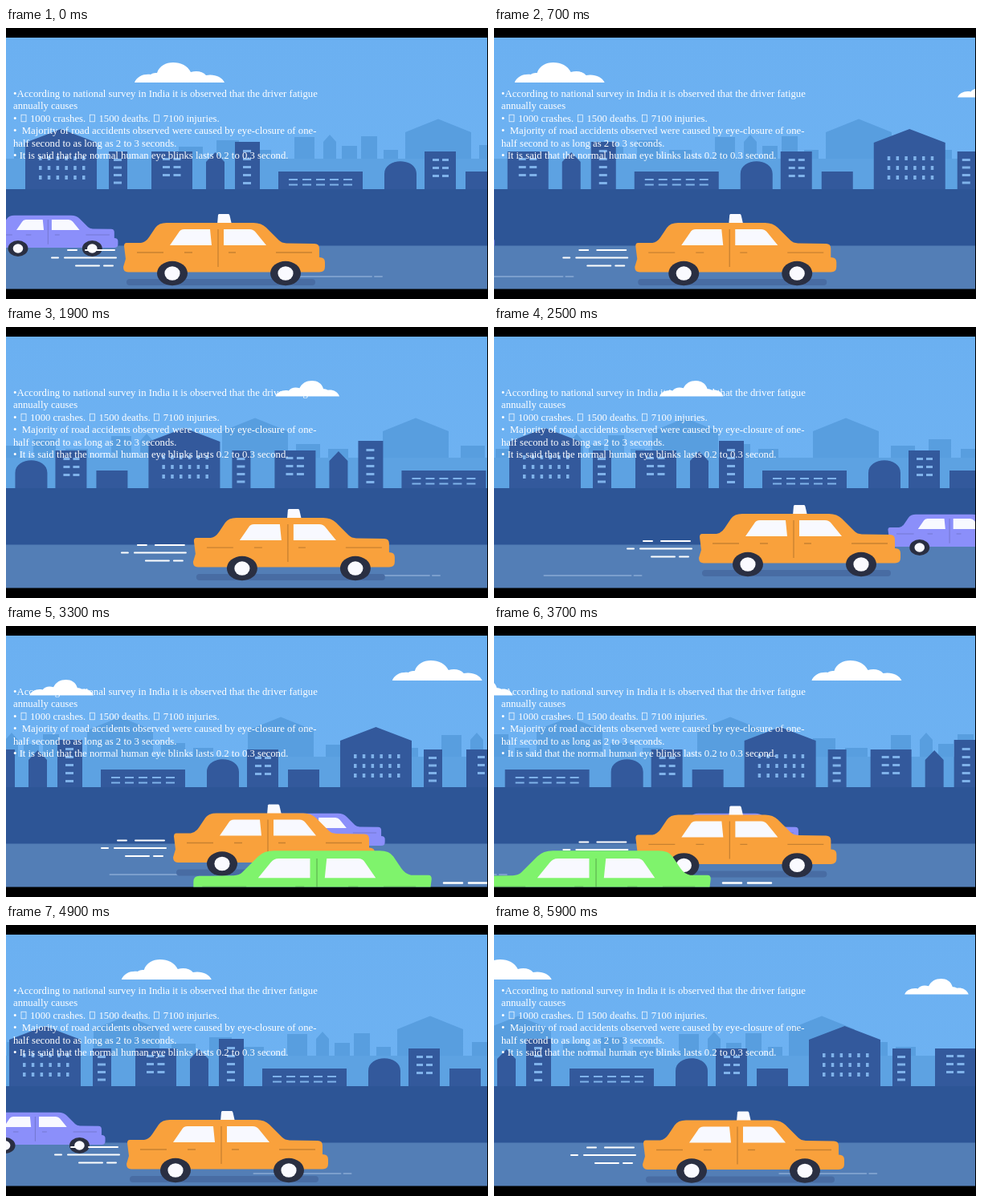
An HTML page that plays this animation: 600 px wide and 338 px high, repeating every 6000 ms.

```html
<!DOCTYPE html>
<html lang="en">
<head>
<meta charset="utf-8">
<title>Driver fatigue</title>
<style>
html, body { margin: 0; width: 100%; height: 100%; overflow: hidden; background: #000; }
svg { display: block; width: 600px; height: 338px; }
text { font: 12.73px "Liberation Serif", "Times New Roman", serif; fill: #fff; white-space: pre; }
</style>
</head>
<body>
<svg viewBox="0 0 600 338">
  <defs>
    <linearGradient id="sky" x1="0" y1="0" x2="0" y2="1">
      <stop offset="0" stop-color="#6bb0f1"/>
      <stop offset="1" stop-color="#6eb2f2"/>
    </linearGradient>
    <clipPath id="stage"><rect y="12" width="599" height="313.500"/></clipPath>
    <path id="cloud" fill="#fff" d="M0 25C3 17 12 14 20 15C23 13 26 13 28 13C31 4 39 0 48 0C58 0 66 4 70 12C77 10 85 11 89 16C99 14 109 18 112 25Z"/>
    <g id="car">
      <path d="M4-38H22Q28-39 32-45L40-57Q44-63 54-63H162Q172-63 178-57L194-41Q197-38 203-37.500L238-37Q244-37 244-31V-20Q251-20 251-14V-8Q251-1.500 244-1.500H6Q0-1.500 0-8L3-18L1-34Q1-38 4-38Z"/>
      <path fill="#f8f9ff" d="M58-35L69-51Q71-55 76-55H108L110-35ZM125-55H157Q162-55 165-51L178-35H125Z"/>
      <path fill="none" stroke="#000" stroke-opacity=".2" stroke-width="1.3" d="M118-55V-8M17-26H50M76-26H86M131-26H140M190-26H235"/>
      <g fill="#2a2f42"><ellipse cx="61" rx="19" ry="15.2"/><ellipse cx="202" rx="19" ry="15.2"/></g>
      <g fill="#fafaff"><ellipse cx="61" rx="9.6" ry="8.7"/><ellipse cx="202" rx="9.6" ry="8.7"/></g>
    </g>
  </defs>
  <g clip-path="url(#stage)">
    <rect y="12" width="600" height="192" fill="url(#sky)"/>
    <g id="far" fill="#589edf"></g>
    <rect y="163" width="600" height="40" fill="#5da2e2"/>
    <g id="near" fill="#33599c"></g>
    <use id="bigCloud" href="#cloud"/>
    <use id="smallCloud" href="#cloud"/>
    <rect y="201" width="600" height="71" fill="#2d5596"/>
    <rect y="271.5" width="600" height="55" fill="#537eb6"/>
    <path id="streak" stroke="#7c9fcd" stroke-width="2" stroke-linecap="round" d="M1 310H109M113 310H122"/>
    <use id="purple" href="#car" fill="#8b8ffa"/>
    <g id="taxi">
      <rect x="4" y="7" width="235" height="8" rx="4" fill="#486ca3"/>
      <path stroke="#fff" stroke-width="2" stroke-linecap="round" d="M-69-29H-58M-47-29H-11M-89-19.500H-81M-73-19.500H-9M-59-9.500H-30M-24-9.500H-13"/>
      <path fill="#fafaff" d="M119-74H131Q132-74 132.500-72L135-61H117L118-73Z"/>
      <use href="#car" fill="#f9a13c"/>
    </g>
    <g id="green">
      <use href="#car" fill="#7ff36c" transform="translate(299 357) scale(-1.22 1.22)"/>
      <path stroke="#fff" stroke-width="2.500" stroke-linecap="round" d="M313 320.500H336M344 320.500H373"/>
    </g>
  </g>
  <g id="copy"></g>
</svg>
<script>
const LOOP = 6000, STEP = 100;
const $ = id => document.getElementById(id);

function add(parent, tag, attrs) {
  const el = document.createElementNS("http://www.w3.org/2000/svg", tag);
  for (const k in attrs) el.setAttribute(k, attrs[k]);
  parent.appendChild(el);
  return el;
}
const move = (id, x, y, scale = "") =>
  $(id).setAttribute("transform", `translate(${x.toFixed(2)} ${y.toFixed(2)}) ${scale}`);

// Skylines are one path each: boxes and pitched roofs standing on the ground line
const GROUND = 204;
const box = (x, w, top) => `M${x} ${GROUND}V${top}h${w}V${GROUND}Z`;
const gable = (x, w, peak, eave) =>
  `M${x} ${GROUND}V${eave}L${x + w / 2} ${peak}L${x + w} ${eave}V${GROUND}Z`;
function grid(x, y, cols, rows, dx, dy, w, h) {
  let d = "";
  for (let i = 0; i < cols; i++)
    for (let j = 0; j < rows; j++) d += `M${x + i * dx} ${y + j * dy}h${w}v${h}h${-w}Z`;
  return d;
}

const BLOCK = 613;
const walls = [
  gable(0, 89, 126, 143), box(104, 23, 154), box(157, 51, 154),
  gable(225, 23, 155, 167), box(261, 31, 142), box(315, 105, 179),
  `M447 ${GROUND}V182C447 161 487 161 487 182V${GROUND}Z`,
  box(497, 39, 154), box(548, 39, 179)
].join("");
const panes = [
  grid(17, 160, 6, 3, 10.8, 12, 3.5, 5), grid(110, 163, 1, 4, 0, 9.5, 10, 3),
  grid(171, 162, 2, 3, 13.5, 10, 9, 3), grid(271, 152, 1, 5, 0, 10, 10, 3),
  grid(328, 188, 5, 2, 17, 6.5, 11, 2), grid(507, 163, 2, 3, 12, 10, 8, 3)
].join("");
for (let i = -1; i < 4; i++) {
  const g = add($("near"), "g", { transform: `translate(${24 + i * BLOCK})` });
  add(g, "path", { d: walls });
  add(g, "path", { d: panes, fill: "#7fb2ea" });
}

const FAR_BLOCK = 579;
const farTops = [[10, 30, 146], [50, 25, 152], [215, 30, 148], [262, 28, 140], [302, 28, 152],
  [359, 25, 136], [418, 19, 147], [442, 20, 135], [470, 18, 152]];
for (let i = 0; i < 3; i++) {
  const o = i * FAR_BLOCK;
  add($("far"), "path", {
    d: farTops.map(([x, w, top]) => box(x + o, w, top)).join("") + gable(395 + o, 16, 133, 142)
  });
}
for (const peak of [538, 738, 1116]) add($("far"), "path", { d: gable(peak - 41, 82, 113.5, 130) });

// Text block, with the empty boxes of the second bullet
const lines = [
  [0, 9, "•According to national survey in India it is observed that the driver fatigue"],
  [1, 9, "annually causes"],
  [2, 9, "•"], [2, 30, "1000 crashes."], [2, 115.5, "1500 deaths."], [2, 195.8, "7100 injuries."],
  [3, 9, "•  Majority of road accidents observed were caused by eye-closure of one-"],
  [4, 9, "half second to as long as 2 to 3 seconds."],
  [5, 9, "• It is said that the normal human eye blinks lasts 0.2 to 0.3 second."]
];
for (const [row, x, str] of lines)
  add($("copy"), "text", { x, y: 86 + row * 15.42 }).textContent = str;
for (const x of [19, 104.3, 184.6])
  add($("copy"), "rect", { x, y: 108.2, width: 6, height: 8.6, fill: "none", stroke: "#fff", "stroke-width": 0.7 });

// time, distance travelled, taxi x, taxi wheel height
const keys = [
  [0, 0, 146, 306], [1400, 332, 205, 305], [2500, 618, 255, 296], [3300, 834, 208, 296.5],
  [4200, 1067, 141, 301.5], [4900, 1246, 150, 306], [5900, 1471, 185, 306.5]
];
function slope(i, c) {
  const a = keys[Math.max(i - 1, 0)], b = keys[Math.min(i + 1, keys.length - 1)];
  return (b[c] - a[c]) / (b[0] - a[0]);
}
function track(t, c) {
  let i = 0;
  while (i < keys.length - 2 && t >= keys[i + 1][0]) i++;
  const a = keys[i], b = keys[i + 1], h = b[0] - a[0], u = (t - a[0]) / h, v = 1 - u;
  return v * v * (1 + 2 * u) * a[c] + u * u * (3 - 2 * u) * b[c]
    + h * u * v * (v * slope(i, c) - u * slope(i + 1, c));
}
const wrap = (x, period, min) => ((x - min) % period + period) % period + min;

function draw(t) {
  const s = track(t, 1);
  move("near", -s, 0);
  move("far", -t * 0.12, 0);
  move("bigCloud", wrap(160 - s * 0.818, 1003, -120), 43);
  move("smallCloud", wrap(711 - s * 0.818, 1003, -120) + 80, 67, "scale(-.71 .78)");
  move("streak", wrap(346 - s * 2.25, 553, -125), 0);
  move("purple", wrap(-25 - s * 0.845, 1037, -200), 275, "scale(.655)");
  move("taxi", track(t, 2), track(t, 3));
  move("green", 232 - (t - 3300) * 0.65, 0);
}

const start = performance.now();
function tick() {
  const t = (performance.now() - start) % LOOP;
  draw(Math.floor(t / STEP) * STEP);
  requestAnimationFrame(tick);
}
tick();
</script>
</body>
</html>
```
